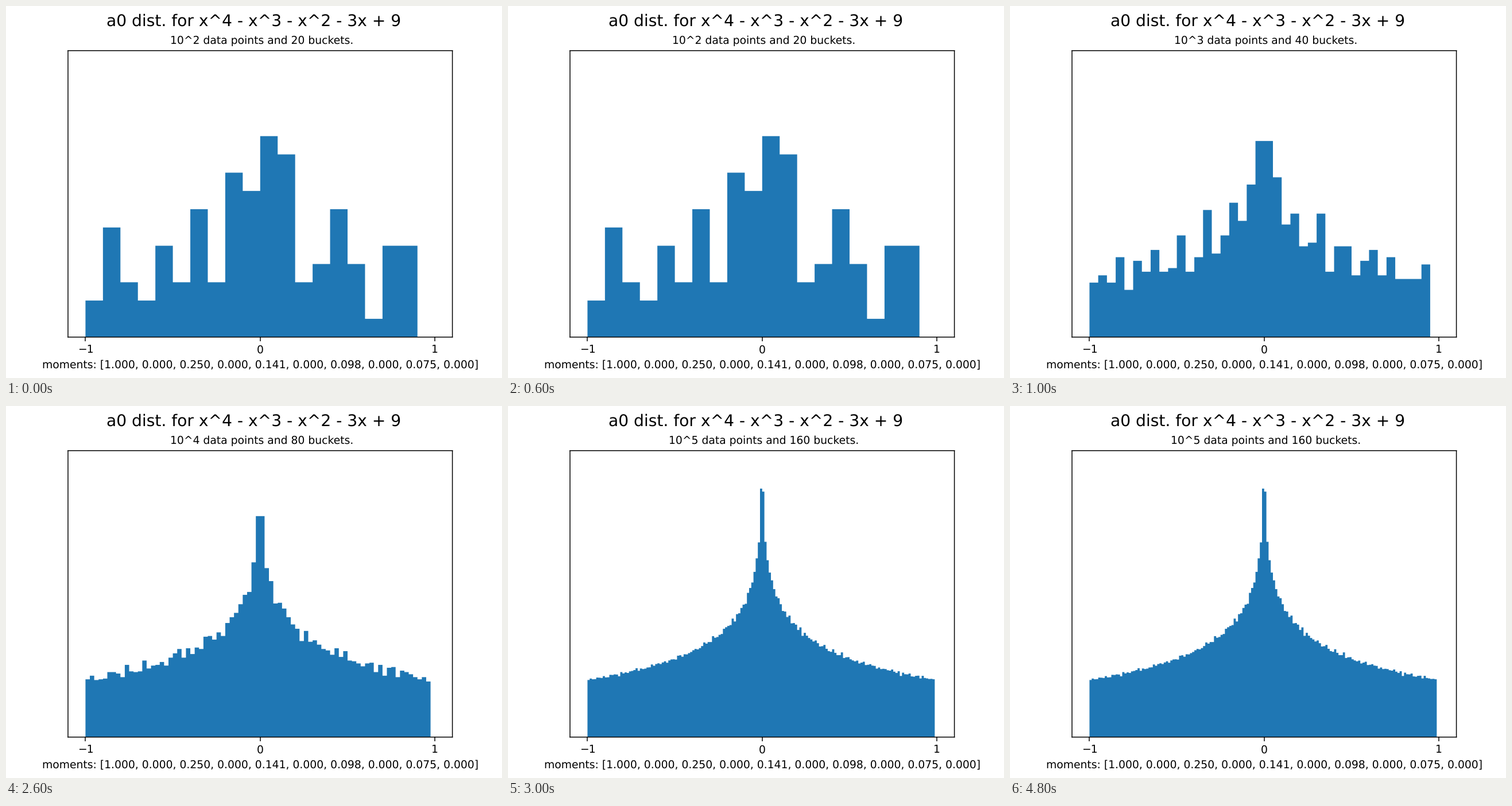
Recreate the animation shown at these times as a matplotlib script. Size 864 by 648 pixels, loop 6000 ms.

```python
import matplotlib.pyplot as plt
import numpy as np
from matplotlib.animation import FuncAnimation

# Frobenius traces of a Weil polynomial: each data point is the mean cosine
# of the angles of its roots raised to the power r.
COEFFICIENTS = [1, -1, -1, -3, 9]
POLYNOMIAL = "x^4 - x^3 - x^2 - 3x + 9"
MOMENT_COUNT = 10
LAST_STAGE = 3


def traces(count):
    powers = np.arange(1, count + 1)
    angles = np.angle(np.roots(COEFFICIENTS))
    return np.cos(np.outer(angles, powers)).mean(axis=0)


def limit_moment(k):
    """k-th moment of cos(a)*cos(b) for independent uniform angles."""
    grid = np.arange(64) * np.pi / 32
    return abs(np.mean(np.cos(grid) ** k)) ** 2


def histogram(stage):
    buckets = 20 * 2**stage
    edges = np.linspace(-1, 1, buckets + 1)[:-1]
    return np.histogram(traces(10 ** (stage + 2)), bins=edges, density=True)


# Keep sub-pixel positions: no glyph hinting and no snapping to pixels.
plt.rcParams["text.hinting"] = "none"

histograms = [histogram(stage) for stage in range(LAST_STAGE + 1)]
moments = ", ".join(f"{limit_moment(k):.3f}" for k in range(MOMENT_COUNT))

fig, ax = plt.subplots(figsize=(6.4, 4.8), dpi=135)
fig.suptitle(f"a0 dist. for {POLYNOMIAL}", fontsize=15)
bars = ax.stairs(*histograms[0], fill=True, color="C0", snap=False)
ax.set_xlim(-1.1, 1.1)
ax.set_ylim(0, 1.6)
ax.set_xticks([-1, 0, 1])
ax.set_yticks([])
ax.set_xlabel(f"moments: [{moments}]")
title = ax.set_title("", fontsize=10)
for line in [*ax.spines.values(), *ax.get_xticklines()]:
    line.set_snap(False)


def draw(tick):
    stage = min(tick, LAST_STAGE)
    bars.set_data(*histograms[stage])
    title.set_text(f" 10^{stage + 2} data points and {20 * 2**stage} buckets.")
    return bars, title


animation = FuncAnimation(fig, draw, frames=6, interval=1000, repeat=True, repeat_delay=0)
plt.show()
```
